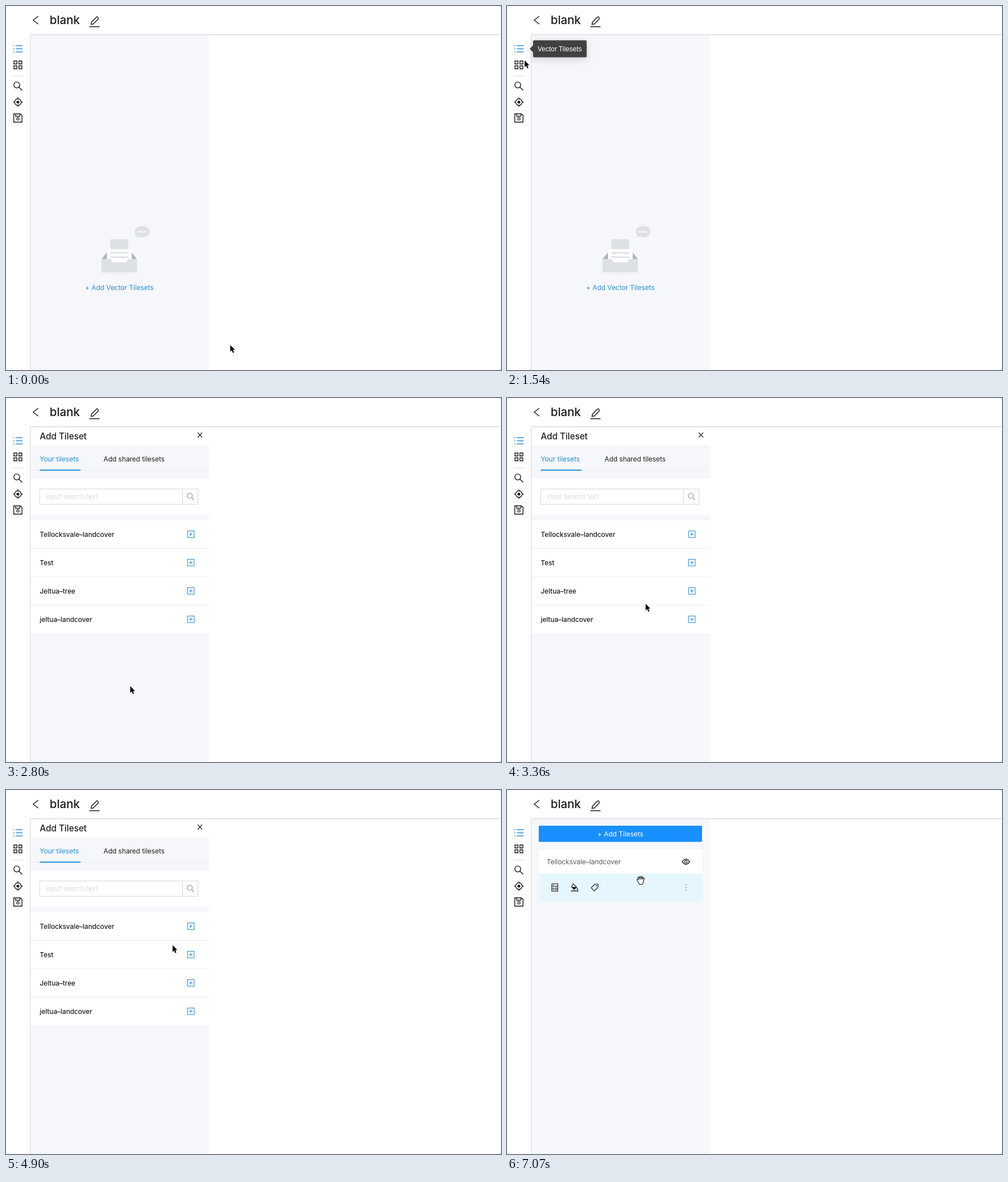
Recreate the animation shown at these times as an HTML page. Size 873 by 642 pixels, loop 8000 ms.

```html
<!DOCTYPE html>
<html lang="en">
<head>
<meta charset="utf-8">
<title>Tileset editor</title>
<style>
  html, body { margin: 0; width: 100%; height: 100%; overflow: hidden; background: #fff; }
  svg { display: block; width: 873px; height: 642px; }
  text { font: 11.9px Inter, "Noto Sans", sans-serif; fill: #1d1d1d; }
  .mid { text-anchor: middle; }
  .title { font-size: 20.5px; font-weight: 500; }
  .head { font-size: 15.3px; font-weight: 500; }
  .row { font-size: 11.8px; font-weight: 500; }
  .hint { font-size: 11.6px; fill: #dadada; }
  .blue { fill: #2b8fd0; }
  #link.hover { fill: #45a5dc; }
  .tip text { font: 12px "Liberation Sans", Arial, sans-serif; fill: #fff; }
  .tip { fill: #404040; filter: drop-shadow(0 3px 7px rgba(0, 0, 0, .17)); }
  .line { fill: none; stroke: #1a1a1a; stroke-width: 1.4; }
  .thin { fill: none; stroke: #1a1a1a; stroke-width: 1.1; }
  .rule { stroke: #ececec; }
  .accent { fill: none; stroke: #2b8fd0; }
  .grey { fill: #dde0e4; }
  #cursor path { stroke-linejoin: round; }
  #arrow { fill: #000; stroke: #fff; stroke-width: 1.6; paint-order: stroke; }
  #hand, #grab { fill: #fff; stroke: #111; stroke-width: 1.1; }
</style>
</head>
<body>
<svg viewBox="0 0 873 642">
  <defs>
    <g id="plus" class="accent" stroke-width="1.1">
      <rect x="-5.8" y="-5.8" width="11.6" height="11.6"/>
      <path d="M-3.2 0H3.2M0-3.2V3.2"/>
    </g>
  </defs>

  <rect width="873" height="642" fill="#fff"/>
  <rect id="panel" x="43" y="51" width="315" height="591" fill="#f5f7fb"/>

  <g id="empty">
    <ellipse cx="200" cy="470.5" rx="35" ry="4" fill="#f1f3f7"/>
    <path class="grey" d="M240 388c7.2 0 13 4.4 13 10s-5.8 10-13 10c-2.4 0-4.600-.5-6.500-1.300l-5 1.300 1.300-3.800C228 402.500 227 400.500 227 398c0-5.600 5.800-10 13-10z"/>
    <g fill="#fff"><circle cx="234.700" cy="398.300" r="1.700"/><circle cx="240" cy="398.300" r="1.700"/><circle cx="245.300" cy="398.300" r="1.700"/></g>
    <path d="M168.500 446.500L178 434.500V446.500ZM231 446.500L221.500 434.500V446.500Z" fill="#b0b4b9"/>
    <rect x="178" y="428.500" width="43.500" height="24" fill="#fbfcfe"/>
    <rect class="grey" x="184" y="411.500" width="31.500" height="17"/>
    <path d="M184 435.500H215.500M184 443H215.500" stroke="#dde0e4" stroke-width="2.300"/>
    <path class="grey" d="M168.500 446.500H184C186.500 446.500 186 452.300 189 452.300H211C214 452.300 213.500 446.500 216 446.500H231V466.500Q231 469.500 228 469.500H171.500Q168.500 469.500 168.500 466.500Z"/>
    <text id="link" class="mid blue" x="200" y="501">+ Add Vector Tilesets</text>
  </g>

  <g id="add">
    <path d="M44 51H358V84H44ZM44 142H358V205.500H44ZM44 216H358V415H44Z" fill="#fff"/>
    <g id="addBody">
      <path class="rule" d="M44 127.500H358M44 265.500H358M44 315.500H358M44 365.500H358"/>
      <text class="head" x="59.500" y="72.500">Add Tileset</text>
      <path class="thin" d="M338 61L346 69.500M346 61L338 69.500"/>
      <text class="blue" x="59.500" y="112">Your tilesets</text>
      <path class="accent" stroke-width="2" d="M59.500 127.300H131.500"/>
      <text x="172" y="112">Add shared tilesets</text>
      <path d="M59.500 160.500H338.500V187.500H59.500ZM311.500 160.500V187.500" fill="none" stroke="#d6d6d6"/>
      <text class="hint" x="70" y="178">input search text</text>
      <path d="M328 176.500L331 179.500M328.600 172.500a4.500 4.500 0 1 1-9 0a4.500 4.500 0 1 1 9 0" fill="none" stroke="#8a8a8a" stroke-width="1.200"/>
      <g id="rows"></g>
    </g>
    <path id="spin" class="accent" stroke-width="1.800" d="M206.900 217.200A12 12 0 0 1 210.600 232.600"/>
  </g>

  <g id="list">
    <rect x="56" y="63" width="288" height="28.500" rx="1.500" fill="#1890ff"/>
    <text class="mid" x="200" y="81.500" style="fill:#fff">+ Add Tilesets</text>
    <rect x="56" y="105" width="288" height="43" rx="2" fill="#fff"/>
    <rect x="56" y="147.500" width="288" height="48.500" fill="#e6f6ff"/>
    <text x="70" y="131" style="fill:#595959">Tellocksvale–landcover</text>
    <path class="line" stroke-width="1.200" d="M309 126.500Q315.500 117.500 322 126.500Q315.500 135.500 309 126.500Z"/>
    <circle class="thin" cx="315.500" cy="126.500" r="2.100"/>
    <path class="thin" d="M79 165.500H89.500V178.500H79ZM79 169.800H89.500M79 174.200H89.500M81 167.700H82.500M81 172H82.500M81 176.400H82.500M85.500 172H88M85.500 176.400H88"/>
    <path d="M113 178H126" stroke="#1a1a1a" stroke-width="1.500"/>
    <path class="thin" d="M116.500 165.500L123 171.500 118.500 175.500 113.800 171Z"/>
    <path d="M114 171H122.500L118.500 175.500ZM124.200 172.500q2.400 3.500 0 3.500t0-3.500z" fill="#1a1a1a"/>
    <path class="thin" stroke-linejoin="round" d="M148.500 172.500L155 166H160.500V171.500L154 178Z"/>
    <circle cx="157.700" cy="168.800" r="1.100" fill="#1a1a1a"/>
    <g fill="#7d8a92"><circle cx="315.500" cy="167.500" r="1"/><circle cx="315.500" cy="172" r="1"/><circle cx="315.500" cy="176.500" r="1"/></g>
  </g>

  <g id="frame">
    <path d="M0 49.500H873" stroke="#f1f1f1"/>
    <path d="M43 50.500H873" stroke="#e1e3e5"/>
    <path d="M43 51.500H873" stroke="#f0f1f3"/>
    <path d="M0 49.500H42" stroke="#fff"/>
    <path d="M42.500 51V642" stroke="#e3e4e6"/>
    <path d="M43.500 51V642" stroke="#eceef1"/>
    <path d="M871.500 0H873V1.500ZM871.500 642H873V640.500Z" fill="#666"/>
  </g>

  <path class="line" stroke-width="1.500" d="M57 18L48 25 57 32"/>
  <text class="title" x="77" y="32">blank</text>
  <path class="line" d="M147 36.500H165M150 32.500L150.700 28.700 159.500 19.500Q160.500 18.500 161.500 19.500L162.700 20.700Q163.600 21.700 162.700 22.700L153.900 31.800Z"/>

  <path class="accent" stroke-width="1.400" d="M17.500 70H29.300M17.500 75.500H29.300M17.500 81H29.300M13 70H14.800M13 75.500H14.800M13 81H14.800"/>
  <path class="line" d="M14 97H19.300V102.300H14ZM22.700 97H28V102.300H22.700ZM14 105.500H19.300V110.800H14ZM22.700 105.500H28V110.800H22.700Z"/>
  <path d="M12 123.500H30" stroke="#dcdcdc"/>
  <circle class="line" cx="19" cy="139.300" r="5.200"/>
  <path class="line" d="M22.700 143L28.600 149"/>
  <circle class="line" cx="21" cy="169.500" r="5.800"/>
  <circle cx="21" cy="169.500" r="2.500" fill="#1a1a1a"/>
  <path class="line" d="M21 161V164M21 175V178M12.500 169.500H15.500M26.500 169.500H29.500"/>
  <path class="line" d="M13.700 190.200H25.500L28.300 193V204.800H13.700ZM17 190.200V194.500H24.500V190.200"/>
  <circle class="line" cx="21" cy="199" r="2.200" style="stroke-width:1.200"/>

  <g id="tipSide" class="tip">
    <path d="M40 75.500L46 69.500V62.500Q46 60.500 48 60.500H138.500Q140.500 60.500 140.500 62.500V88.500Q140.500 90.500 138.500 90.500H48Q46 90.500 46 88.500V81.500Z"/>
    <text class="mid" x="93" y="80">Vector Tilesets</text>
  </g>
  <g id="tipRow" class="tip">
    <path d="M59.500 186.500H194Q196 186.500 196 188.500V213.500Q196 215.500 194 215.500H133L126.500 222 120 215.500H59.500Q57.500 215.500 57.500 213.500V188.500Q57.500 186.500 59.500 186.500Z"/>
    <text class="mid" x="126.700" y="205.500">Tellocksvale-landcover</text>
  </g>

  <g id="cursor">
    <path id="arrow" d="M0 0V11.800L2.700 9.300 4.700 13.900 6.700 13 4.700 8.500H8.400Z"/>
    <path id="hand" d="M-1.800 1.200C-1.800-.6 .6-.6 1 1.200L2.300 6C2.600 4.600 4.600 4.600 5 5.900 5.600 5 7.200 5.200 7.500 6.300 8.400 5.800 9.600 6.400 9.600 7.600 9.800 10 9 11.500 8.200 14H1.500C.6 12-1.500 10.500-3.200 8.900-4.200 7.600-2.600 6.400-1.200 7.400L-.2 8.200Z"/>
    <path id="grab" d="M-4.200 2.500L-6.200-.5C-6.800-2-5-2.800-4.200-1.600L-3.800-1-4.600-4.800C-4.600-6.300-2.900-6.300-2.500-5L-1.600-2V-6.200C-1.400-7.600 .4-7.600 .6-6.200L.8-2.200 1.800-5.900C2.300-7.200 4-6.800 3.800-5.300L3.200-1.800 4.800-4C5.800-5 7-4.200 6.500-2.800L5.200 1.500C5 4 4 5 3.600 7H-2.200C-2.400 5-3.500 4-4.200 2.500Z"/>
  </g>
</svg>

<script>
const LOOP = 8000, STEP = 70;
const $ = id => document.getElementById(id);
const show = (id, on) => { $(id).style.display = on ? '' : 'none'; };
const clamp = v => Math.max(0, Math.min(1, v));
const ramp = (t, from, to) => clamp((t - from) / (to - from));
const smooth = v => v * v * (3 - 2 * v);

$('rows').innerHTML = ['Tellocksvale–landcover', 'Test', 'Jeltua–tree', 'jeltua–landcover']
  .map((name, i) => `<text class="row" x="59.5" y="${244.7 + 50 * i}">${name}</text>
    <use href="#plus" x="326" y="${240.3 + 50 * i}"/>`).join('');

// Pointer stops: time, x, y, and 1 where the move to the stop is eased
const stops = [
  [0, 395.5, 598], [70, 395.5, 598], [840, 23, 76, 1], [1190, 24, 78], [1540, 31, 96],
  [1680, 243, 484], [1960, 236, 537, 1], [2450, 212, 503, 1], [2590, 213, 506],
  [2730, 214, 514], [3080, 264, 458, 1], [3150, 264, 458], [3360, 244.5, 363],
  [3710, 116, 226, 1], [3990, 89, 250, 1], [4060, 93, 248], [4340, 93, 248],
  [4690, 230, 327, 1], [5040, 328.5, 245, 1], [6650, 328.5, 245], [7070, 235.5, 159.5, 1],
  [LOOP, 235.5, 159.5]
];

function pointerAt(t) {
  const i = Math.max(1, stops.findIndex(s => s[0] >= t));
  const [t0, x0, y0] = stops[i - 1], [t1, x1, y1, eased] = stops[i];
  const k = ramp(t, t0, t1), e = eased ? smooth(k) : k;
  return [x0 + (x1 - x0) * e, y0 + (y1 - y0) * e];
}

function fadeTip(id, k, x, y) {
  const s = .8 + .2 * k;
  show(id, k > 0);
  $(id).style.opacity = k;
  $(id).setAttribute('transform', `translate(${x * (1 - s)} ${y * (1 - s)}) scale(${s})`);
}

function draw(time) {
  const t = Math.floor(time / STEP) * STEP;
  const adding = t >= 2660 && t < 6160;
  const listed = t >= 6230;
  const empty = !adding && !listed;
  const loading = adding && t >= 5810;
  const [x, y] = pointerAt(t);
  const inBox = (l, top, r, b) => x >= l && x <= r && y >= top && y <= b;

  show('empty', empty);
  show('add', adding);
  show('list', listed);
  show('spin', loading);
  $('panel').setAttribute('fill', loading ? '#f4f8fd' : '#f5f7fb');
  $('addBody').style.opacity = loading ? 1 - .5 * Math.sqrt(ramp(t, 5740, 6090)) * 1.1 : 1;
  $('spin').setAttribute('transform', `rotate(${(t - 6020) * .36} 200 227)`);

  const onLink = empty && inBox(138, 488, 262, 508);
  $('link').classList.toggle('hover', onLink);
  fadeTip('tipSide', ramp(t, 840, 980) - ramp(t, 1680, 1890), 40, 75.5);
  fadeTip('tipRow', ramp(t, 4200, 4270) - ramp(t, 4480, 4620), 126.5, 222);

  const onIcon = inBox(12, 66, 29, 112);
  const onPlus = adding && !loading && inBox(319, 233, 333, 247);
  const hand = onLink || onIcon || onPlus;
  const grab = listed && inBox(56, 105, 344, 196);
  show('hand', hand);
  show('grab', grab);
  show('arrow', !hand && !grab);
  $('cursor').setAttribute('transform', `translate(${x} ${y})`);
}

const start = performance.now();
function tick() {
  draw((performance.now() - start) % LOOP);
  requestAnimationFrame(tick);
}
tick();
</script>
</body>
</html>
```
